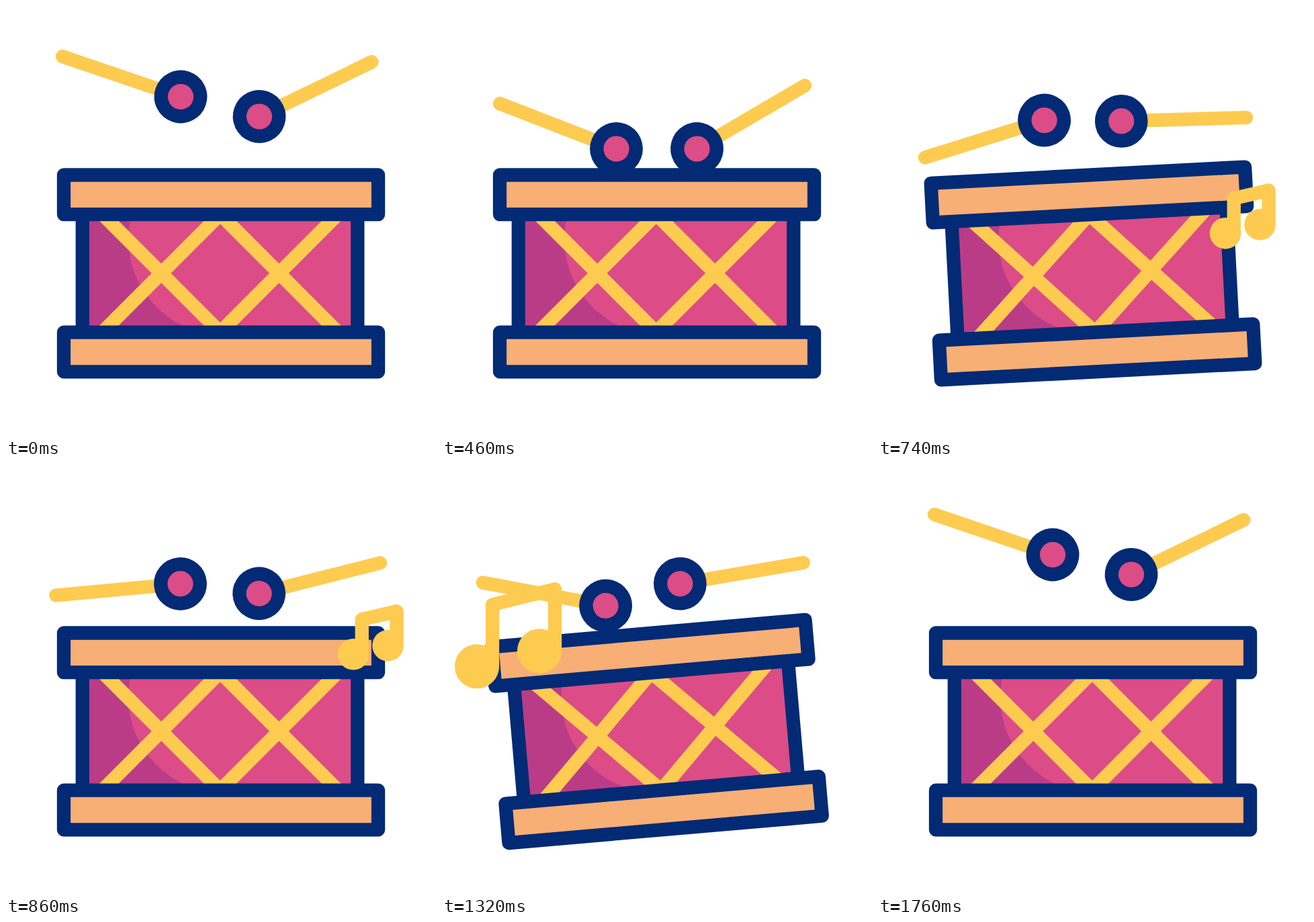
Recreate the animation shown at these times as an HTML page. Size 640 px wide and 640 px high, loop 2.4 s.

```html
<!DOCTYPE html>
<html>
<head>
<meta charset="utf-8">
<style>
  html, body { margin: 0; height: 100%; overflow: hidden; background: #fff; }
  svg { display: block; width: 100%; height: 100%; }
  .navy { stroke: #032a75; stroke-width: 20.3; stroke-linejoin: round; }
  .gold { stroke: #fecb51; stroke-width: 20.3; stroke-linecap: round; stroke-linejoin: round; fill: none; }
  .pink { fill: #dc4c86; }
  .rim { fill: #f7af75; }
  .note circle { fill: #fecb51; stroke: none; }
</style>
</head>
<body>
<svg viewBox="0 0 640 640">
  <clipPath id="body"><rect x="114" y="310" width="409" height="176"/></clipPath>
  <g id="drum">
    <g clip-path="url(#body)">
      <rect x="114" y="310" width="409" height="176" fill="#ba3c87"/>
      <path class="pink" d="M325 204H530V490H325A141 141 0 0 1 325 204Z"/>
      <path class="gold" d="M143.500 310L318.800 485.500M143.500 485.500L318.800 310M318.800 310L494 485.500M318.800 485.500L494 310"/>
    </g>
    <path class="navy" d="M113.800 310V486M523.300 310V486"/>
    <rect class="navy rim" x="86" y="251.500" width="468" height="58.700"/>
    <rect class="navy rim" x="86" y="485.700" width="468" height="58.700"/>
    <g id="left"><path class="gold" d="M0 0H-186"/><circle class="navy pink" r="29.200"/></g>
    <g id="right"><path class="gold" d="M0 0H186"/><circle class="navy pink" r="29.200"/></g>
  </g>
  <g id="bigNote" class="note">
    <path class="gold" d="M75 125V33L168 10V102"/>
    <circle cx="52" cy="125" r="33"/><circle cx="145" cy="102" r="33"/>
  </g>
  <g id="smallNote" class="note">
    <path class="gold" d="M529.700 74V22L581.500 10V61"/>
    <circle cx="517" cy="74" r="23.300"/><circle cx="568.500" cy="61" r="23.300"/>
  </g>
</svg>
<script>
const LOOP = 2400;
const $ = id => document.getElementById(id);
const clamp = v => Math.min(1, Math.max(0, v));
const ease = p => (1 - Math.cos(Math.PI * clamp(p))) / 2;

// Keys are [time, value, ...]
const tilt = [[480, 0], [580, -9.4], [840, 0], [1035, 0], [1230, -6], [1560, 0]];

// Stick keys: time, head x, head y, angle
const leftHit = t => [t, 259.5, 212.5, 21.2];
const leftKeys = [
  [0, 260, 135, 18.8], leftHit(460), [670, 259.5, 164.5, -16], leftHit(1200),
  [1320, 260, 205, 15.6], leftHit(1440), [1760, 260, 135, 18.8]
];
const rightHit = t => [t, 379.5, 212.5, -30.4];
const rightKeys = [
  [0, 377, 164.5, -25.9], rightHit(460), [640, 373, 167.5, 6.6], rightHit(1050),
  [1240, 371, 171.5, 4.1], rightHit(1480), [1760, 377, 164.5, -25.9]
];

function sample(keys, t) {
  const i = keys.findIndex(k => k[0] > t);
  if (i < 0) return keys[keys.length - 1].slice(1);
  if (!i) return keys[0].slice(1);
  const a = keys[i - 1], b = keys[i];
  const p = ease((t - a[0]) / (b[0] - a[0]));
  return a.slice(1).map((v, j) => v + (b[j + 1] - v) * p);
}

function poseStick(id, keys, t) {
  const [x, y, angle] = sample(keys, t);
  $(id).setAttribute('transform', `translate(${x} ${y}) rotate(${angle})`);
}

function poseNote(id, t, from, to) {
  const y = from + (to - from) * ease(t / 620);
  $(id).setAttribute('transform', `translate(0 ${y})`);
  $(id).setAttribute('opacity', Math.min(clamp(t / 112), clamp((620 - t) / 200)));
}

function draw(now) {
  const t = now % LOOP;
  $('drum').setAttribute('transform', `rotate(${sample(tilt, t)[0]} 320 398)`);
  poseStick('left', leftKeys, t);
  poseStick('right', rightKeys, t);
  poseNote('smallNote', t - 575, 298, 96);
  poseNote('bigNote', t - 1035, 265, 63);
}

const start = performance.now();
function tick() {
  draw(performance.now() - start);
  requestAnimationFrame(tick);
}
tick();
</script>
</body>
</html>
```
